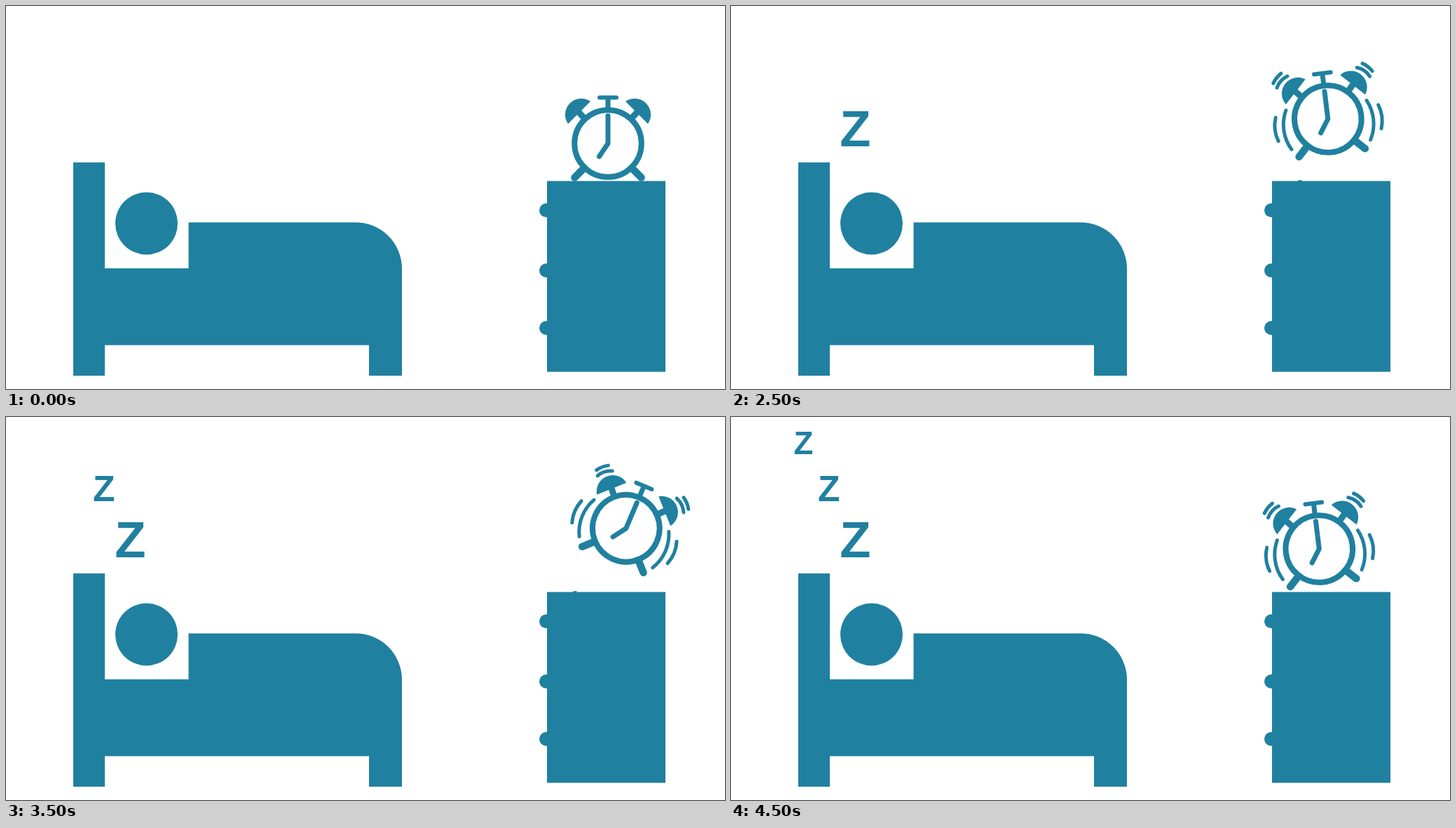
Animation, 1026 px wide and 546 px high, one loop 5 s. Source, as an HTML page:

```html
<!DOCTYPE html>
<html lang="en">
<head>
<meta charset="utf-8">
<title>Sleeper and alarm clock</title>
<style>
  html, body { margin: 0; width: 100%; height: 100%; overflow: hidden; background: #fff; }
  svg { display: block; width: 100%; height: 100%; }
  text { font-family: "Liberation Sans", Arial, sans-serif; font-weight: bold; }
  .line { fill: none; stroke: #2080a0; stroke-linecap: round; stroke-linejoin: round; }
</style>
</head>
<body>
<svg viewBox="0 0 1026 546" fill="#2080a0">
  <path d="M96 223H141V374H260.500V308.500H499A66 66 0 0 1 565 374.500V527H518V483.500H141V527H96Z"/>
  <circle cx="200.500" cy="310" r="44.500"/>

  <g id="zs">
    <text x="155.300" y="200" font-size="72.500">Z</text>
    <text x="123.900" y="119.500" font-size="51.500">Z</text>
    <text x="89.400" y="52.800" font-size="45.500">Z</text>
  </g>

  <path d="M772 249.500H941V521.500H772Z"/>
  <circle cx="771" cy="291.300" r="10"/>
  <circle cx="771" cy="377" r="10"/>
  <circle cx="771" cy="459" r="10"/>
  <ellipse id="mark" cx="812" cy="249.500" rx="3" ry="1.500"/>

  <g id="clock">
    <circle class="line" r="47.800" stroke-width="8"/>
    <path class="line" stroke-width="7" d="M0-39.500V0L-12.500 18.500"/>
    <path class="line" stroke-width="6" d="M-12-65.500H12"/>
    <path class="line" stroke-width="7" d="M0-64V-50"/>
    <g id="half">
      <path d="M25-60A23 23 0 0 1 57-28Z"/>
      <path class="line" stroke-width="9" style="stroke-linecap:butt" d="M42-45L32-34"/>
      <path class="line" stroke-width="10.500" d="M34 35L47.500 48.500"/>
      <g class="line shake" stroke-width="5">
        <path d="M58-19.500A60 60 0 0 1 56.800 36.800"/>
        <path d="M73.800-11A50 50 0 0 1 74 22.800"/>
        <path d="M50-67.600A29 29 0 0 1 66.700-53"/>
        <path d="M58.500-72.500A37 37 0 0 1 71.200-60"/>
      </g>
    </g>
    <use href="#half" transform="scale(-1 1)"/>
  </g>
</svg>
<script>
  const LOOP = 5000, REST = 2000, STEP = 500;

  // Clock centre, tilt in degrees, number of letters
  const poses = [
    [859, 196, 0, 0],
    [846.5, 158.5, -16.2, 1],
    [851.8, 161, -7, 1],
    [867, 166, 14.3, 2],
    [884.8, 158.7, 23, 2],
    [855.7, 162.5, 7.4, 3],
    [839.3, 188, -7, 3]
  ];

  const get = id => document.getElementById(id);
  const clock = get("clock"), mark = get("mark");
  const letters = [...get("zs").children];
  const shake = document.querySelector(".shake");
  const show = (el, on) => el.setAttribute("visibility", on ? "visible" : "hidden");

  function draw(time) {
    const t = time % LOOP;
    const i = t < REST ? 0 : 1 + Math.floor((t - REST) / STEP);
    const [x, y, tilt, count] = poses[i];
    clock.setAttribute("transform", `translate(${x} ${y}) rotate(${tilt})`);
    show(shake, i > 0);
    show(mark, i > 0 && i < poses.length - 1);
    letters.forEach((z, n) => show(z, n < count));
  }

  const start = performance.now();
  function tick() {
    draw(performance.now() - start);
    requestAnimationFrame(tick);
  }
  tick();
</script>
</body>
</html>
```
